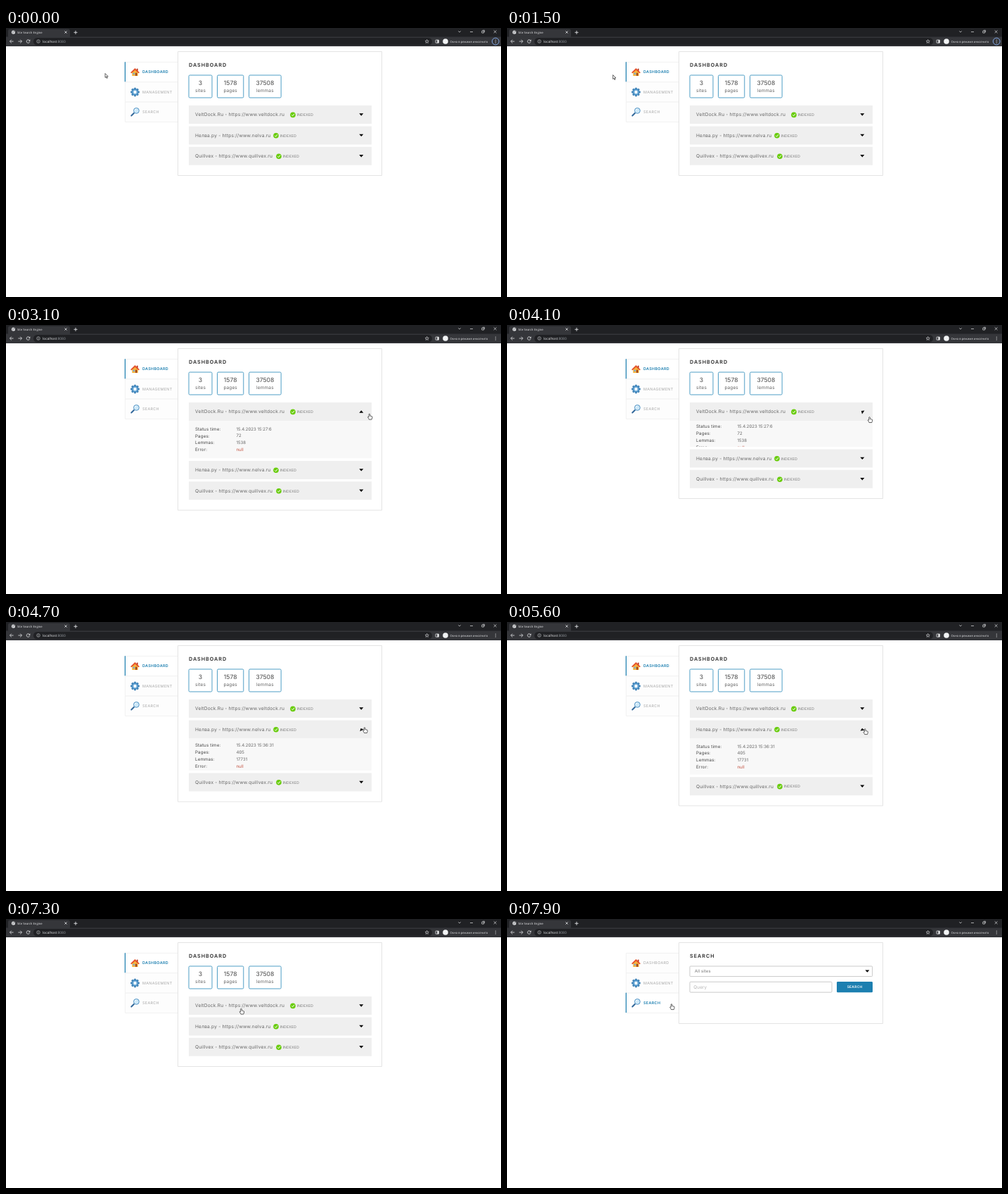
Animation, 704 px wide and 382 px high, one loop 8000 ms. Source, as an HTML page with a canvas:

```html
<!DOCTYPE html>
<html lang="en">
<head>
<meta charset="utf-8">
<title>Site Search Engine</title>
<style>
html, body { margin: 0; width: 100%; height: 100%; overflow: hidden; background: #fff; }
canvas { display: block; width: 704px; height: 382px; }
</style>
</head>
<body>
<canvas id="stage"></canvas>
<script>
const W = 704, H = 382, LOOP = 8000, STEP = 100, SLIDE = 400, DETAIL_H = 53.5;
const MENU_BLUR = 2700, PAGE_SWITCH = 7800;
const UI = '"Open Sans", "Noto Sans", sans-serif';
const PAGE = 'Inter, "Noto Sans", sans-serif';
const BLUE = '#1c7fb0';

const canvas = document.getElementById('stage');
const ctx = canvas.getContext('2d');
const ratio = window.devicePixelRatio || 1;
canvas.width = W * ratio;
canvas.height = H * ratio;

const sites = [
  { label: 'VeltDock.Ru - https://www.veltdock.ru', badge: 408, opens: 2700, closes: 3950,
    details: ['15.4.2023 15:27:6', '72', '1538', 'null'] },
  { label: 'Нелва.ру - https://www.nelva.ru', badge: 384, opens: 4400, closes: 5550,
    details: ['15.4.2023 15:36:31', '405', '17731', 'null'] },
  { label: 'Quillvex - https://www.quillvex.ru', badge: 388, opens: 6090, closes: 6900,
    details: ['15.4.2023 15:45:12', '1101', '18239', 'null'] }
];

// Pointer tip: time, x, y
const pointerPath = [
  [0, 141, 64.5], [1000, 141, 64.5], [1200, 139, 64.8], [1400, 139, 64.8],
  [2300, 525.5, 125], [2600, 516.8, 126], [4000, 516.8, 126], [4350, 510, 149.5],
  [4800, 510, 149.5], [5000, 509.2, 151.5], [5600, 509.2, 151.5], [6000, 503.3, 178],
  [6400, 503.3, 178], [6500, 503, 180], [6900, 503, 180], [7300, 334.5, 127],
  [7700, 236, 122], [7900, 234, 120.5]
];

const swing = x => 0.5 - 0.5 * Math.cos(Math.PI * Math.min(1, Math.max(0, x)));
const openness = (site, t) =>
  swing((t - site.opens) / SLIDE) * (1 - swing((t - site.closes) / SLIDE));

function pointerAt(t) {
  const i = pointerPath.findIndex(key => key[0] > t);
  if (i < 0) return pointerPath.at(-1).slice(1);
  const [t0, x0, y0] = pointerPath[i - 1], [t1, x1, y1] = pointerPath[i];
  const k = swing((t - t0) / (t1 - t0));
  return [x0 + (x1 - x0) * k, y0 + (y1 - y0) * k];
}

function text(str, x, y, size, color, o = {}) {
  ctx.font = `${o.weight || 400} ${size}px ${o.family || PAGE}`;
  ctx.letterSpacing = (o.spacing || 0) + 'px';
  ctx.textAlign = o.align || 'left';
  ctx.fillStyle = color;
  ctx.fillText(str, x, y + size * 0.36);
  return ctx.measureText(str).width;
}

function rect(x, y, w, h, fill, radius = 0) {
  ctx.fillStyle = fill;
  ctx.beginPath();
  ctx.roundRect(x, y, w, h, radius);
  ctx.fill();
}

function frame(x, y, w, h, color, radius = 0, width = 1) {
  ctx.strokeStyle = color;
  ctx.lineWidth = width;
  ctx.beginPath();
  ctx.roundRect(x, y, w, h, radius);
  ctx.stroke();
}

function line(color, width, ...p) {
  ctx.strokeStyle = color;
  ctx.lineWidth = width;
  ctx.beginPath();
  for (let i = 0; i < p.length; i += 2) ctx.lineTo(p[i], p[i + 1]);
  ctx.stroke();
}

function polygon(fill, ...p) {
  ctx.fillStyle = fill;
  ctx.beginPath();
  for (let i = 0; i < p.length; i += 2) ctx.lineTo(p[i], p[i + 1]);
  ctx.closePath();
  ctx.fill();
}

function disc(x, y, r, fill) {
  ctx.fillStyle = fill;
  ctx.beginPath();
  ctx.arc(x, y, r, 0, Math.PI * 2);
  ctx.fill();
}

function ring(x, y, r, color, width, from = 0, to = Math.PI * 2) {
  ctx.strokeStyle = color;
  ctx.lineWidth = width;
  ctx.beginPath();
  ctx.arc(x, y, r, from, to);
  ctx.stroke();
}

function at(x, y, draw, angle = 0) {
  ctx.save();
  ctx.translate(x, y);
  ctx.rotate(angle);
  draw();
  ctx.restore();
}

function browserBar(t) {
  const light = '#e4e5e7';
  rect(0, 0, W, 13, '#202124');
  rect(3, 1.5, 88, 13, '#35363a', 3);
  rect(0, 12.5, W, 13.5, '#35363a');
  rect(39, 14, 567, 10.5, '#202124', 5.2);

  disc(10.5, 6, 2.6, light);
  line('#35363a', 0.6, 8.6, 5, 10.2, 6, 9.7, 7.6);
  line('#35363a', 0.6, 11.2, 4, 11.6, 5.6, 12.8, 6.2);
  text('Site Search Engine', 16, 6, 4.2, light, { family: UI });
  line(light, 0.8, 83.4, 4.4, 86.6, 7.6);
  line(light, 0.8, 86.6, 4.4, 83.4, 7.6);
  line(light, 0.9, 96.5, 6.3, 101.5, 6.3);
  line(light, 0.9, 99, 3.8, 99, 8.8);

  line(light, 0.7, 643.3, 4.4, 645, 6, 646.7, 4.4);
  line(light, 0.7, 660, 5.5, 664, 5.5);
  frame(676.8, 4.2, 2.8, 2.8, light, 0, 0.7);
  line(light, 0.6, 677.8, 3.2, 680.6, 3.2, 680.6, 6);
  line(light, 0.7, 693.7, 3.4, 697.5, 7.2);
  line(light, 0.7, 697.5, 3.4, 693.7, 7.2);

  for (const [x, dir] of [[8, -1], [20, 1]]) {
    line(light, 0.8, x - 2.6 * dir, 19, x + 2.4 * dir, 19);
    line(light, 0.8, x + 0.2 * dir, 16.6, x + 2.6 * dir, 19, x + 0.2 * dir, 21.4);
  }
  ring(31.5, 19, 2.3, light, 0.8, 0.3, 5.5);
  polygon(light, 34.3, 16.2, 34.3, 18.7, 31.8, 18.7);
  ring(46, 19, 2.3, '#c4c7ca', 0.6);
  line('#c4c7ca', 0.7, 46, 18.6, 46, 20.4);
  line('#c4c7ca', 0.7, 46, 17.4, 46, 18);
  const host = text('localhost', 52, 19, 4.85, '#e8eaed', { family: UI });
  text(':8080', 52 + host, 19, 4.85, '#9aa0a6', { family: UI });

  at(598.7, 19.2, () => {
    const star = [];
    for (let i = 0; i < 11; i++) {
      const r = i % 2 ? 1.2 : 2.7, a = i * Math.PI / 5 - Math.PI / 2;
      star.push(r * Math.cos(a), r * Math.sin(a));
    }
    line(light, 0.6, ...star);
  });
  frame(611, 17, 4.4, 4.2, light, 0.4, 0.8);
  rect(613.3, 17, 2.2, 4.2, light);
  disc(625, 19, 3.8, '#f1f3f4');
  text('Окно в режиме инкогнито', 631.5, 19, 4.2, light, { family: UI });
  for (const dy of [-2, 0, 2]) disc(696.3, 19 + dy, 0.6, light);
  if (t < MENU_BLUR) ring(696.2, 19, 4.9, '#8ab4f8', 0.9);
}

function houseIcon() {
  polygon('#f6b53c', -4.2, 0, 0, -4, 4.2, 0, 4.2, 5.2, -4.2, 5.2);
  rect(2.3, -5, 1.8, 4, '#b4371f');
  polygon('#e5532d', -6.5, 0.6, 0, -5.8, 6.5, 0.6, 5, 1.6, 0, -3, -5, 1.6);
  rect(-2.8, 1, 2.4, 2.4, '#7aa9d6');
  rect(0.6, 1, 2.2, 4.2, '#9c3d1c');
}

function gearIcon() {
  for (let i = 0; i < 8; i++) at(0, 0, () => rect(-1.4, -6.3, 2.8, 3.4, '#3f81b5', 0.6), i * Math.PI / 4);
  disc(0, 0, 4.9, '#4a8fc4');
  disc(0, 0, 3.1, '#8fbfe2');
  disc(0, 0, 1.9, '#fff');
}

function lensIcon() {
  ctx.lineCap = 'round';
  line('#34699b', 2, -5.2, 5.2, -1.4, 1.4);
  ctx.lineCap = 'butt';
  disc(1.9, -1.9, 4.1, '#cde8f8');
  ring(1.9, -1.9, 3.9, '#5795c4', 1);
  ring(1.9, -1.9, 2.3, '#fff', 0.9, 3.3, 4.6);
}

function sidebar(active) {
  const items = [['DASHBOARD', houseIcon], ['MANAGEMENT', gearIcon], ['SEARCH', lensIcon]];
  items.forEach(([label, icon], i) => {
    const top = 48.5 + i * 28.3, mid = top + 14, on = i === active;
    rect(169, top, 75.5, 28.3, on ? '#fff' : '#fdfdfd');
    line('#ececec', 0.7, 244, top, 169.4, top, 169.4, top + 28.3, 244, top + 28.3);
    if (on) rect(168.8, top - 0.3, 1.2, 28.3, BLUE);
    at(183.5, mid + 0.2, icon);
    text(label, 194, mid, 5.4, on ? BLUE : '#a8a8a8', { weight: on ? 600 : 400, spacing: 0.35 });
  });
}

function panel(title, bottom) {
  rect(244.5, 33.5, 290, bottom - 33.5, '#fff');
  frame(244.5, 33.5, 290, bottom - 33.5, '#dedede', 0, 0.8);
  text(title, 260, 52, 7.2, '#2b2b2b', { weight: 600, spacing: 1 });
}

function arrow(x, y, turn = 0) {
  at(x, y, () => polygon('#000', -3, -1.7, 3, -1.7, 0, 1.7), turn * Math.PI);
}

function statBox(x, w, value, label) {
  frame(x, 67, w, 32, '#3b93bf', 1.5, 0.9);
  text(value, x + w / 2, 77.7, 8.6, '#484848', { align: 'center' });
  text(label, x + w / 2, 88.3, 6.5, '#666', { align: 'center', spacing: 0.12 });
}

function siteRow(site, top, open) {
  const mid = top + 13, bottom = top + 26;
  rect(260, top, 260, 26, '#efefef');
  text(site.label, 269, mid - 0.1, 6.6, '#666', { spacing: 0.2 });
  disc(site.badge, mid + 0.4, 3.8, '#69cc0c');
  line('#fff', 1, site.badge - 1.8, mid + 0.5, site.badge - 0.4, mid + 1.9, site.badge + 2, mid - 1.2);
  text('INDEXED', site.badge + 5.5, mid + 0.4, 5.1, '#777', { spacing: 0.2 });
  arrow(505.3, mid, open);
  if (open <= 0) return;

  ctx.save();
  ctx.beginPath();
  ctx.rect(260, bottom, 260, DETAIL_H * open);
  ctx.clip();
  rect(260, bottom, 260, DETAIL_H, '#f8f8f8');
  ['Status time:', 'Pages:', 'Lemmas:', 'Error:'].forEach((name, i) => {
    const y = bottom + 11.4 + 12 * (open - 1) + i * 9.9;
    text(name, 269, y, 6.2, '#444', { spacing: 0.15 });
    text(site.details[i], 327.5, y, 6.1, i === 3 ? '#c2513f' : '#666');
  });
  ctx.restore();
}

function dashboard(t) {
  const open = sites.map(site => openness(site, t));
  const extra = open.reduce((sum, p) => sum + p * DETAIL_H, 0);
  panel('DASHBOARD', 209.5 + extra);
  statBox(260, 33, '3', 'sites');
  statBox(300.5, 37.3, '1578', 'pages');
  statBox(345.6, 45.6, '37508', 'lemmas');
  let top = 110;
  sites.forEach((site, i) => {
    siteRow(site, top, open[i]);
    top += 29.4 + open[i] * DETAIL_H;
  });
}

function searchPage() {
  panel('SEARCH', 148.5);
  frame(260, 67, 259.6, 14.6, '#bdbdbd', 1.2, 0.8);
  text('All sites', 267, 74.2, 6, '#777', { spacing: 0.08 });
  arrow(512.4, 74.1);
  frame(260, 89.3, 202, 14.8, '#bdbdbd', 1.2, 0.8);
  text('Query', 265.3, 96.5, 6.4, '#b5b5b5', { spacing: 0.1 });
  rect(469, 89, 51, 15.3, BLUE, 1.4);
  text('SEARCH', 494.6, 96.6, 4.9, '#fff', { weight: 600, spacing: 0.3, align: 'center' });
}

function outlined(path) {
  ctx.fillStyle = '#fff';
  ctx.fill(path);
  ctx.strokeStyle = '#222';
  ctx.lineWidth = 0.7;
  ctx.stroke(path);
}

const arrowShape = new Path2D('M0 0V5.9L1.4 4.7L2.3 6.9L3.3 6.5L2.4 4.3H4.2Z');
const handShape = new Path2D(
  'M-.8 4.8V.7Q0-.4.8.7V3.1L2 3.3L3.1 3.6L4 4V6L3.3 8.1H-.5L-1.4 6.3L-2.4 4.8Q-2-.1-.8 4.8Z'
    .replace('Q-2-.1-.8 4.8', 'Q-2.1 3.7-.8 4.8'));

function pointer(t) {
  const [x, y] = pointerAt(t);
  const overRow = x > 260 && x < 520 && y > 110;
  const overMenu = x > 169 && x < 244 && y > 48;
  at(x, y, () => outlined(overRow || overMenu ? handShape : arrowShape));
}

function render(now) {
  const t = Math.floor(now % LOOP / STEP) * STEP;
  const searching = t >= PAGE_SWITCH;
  ctx.setTransform(ratio, 0, 0, ratio, 0, 0);
  ctx.textRendering = 'geometricPrecision';
  rect(0, 0, W, H, '#fff');
  browserBar(t);
  sidebar(searching ? 2 : 0);
  if (searching) searchPage();
  else dashboard(t);
  pointer(t);
}

const start = performance.now();
function tick() {
  render(performance.now() - start);
  requestAnimationFrame(tick);
}
tick();
</script>
</body>
</html>
```
